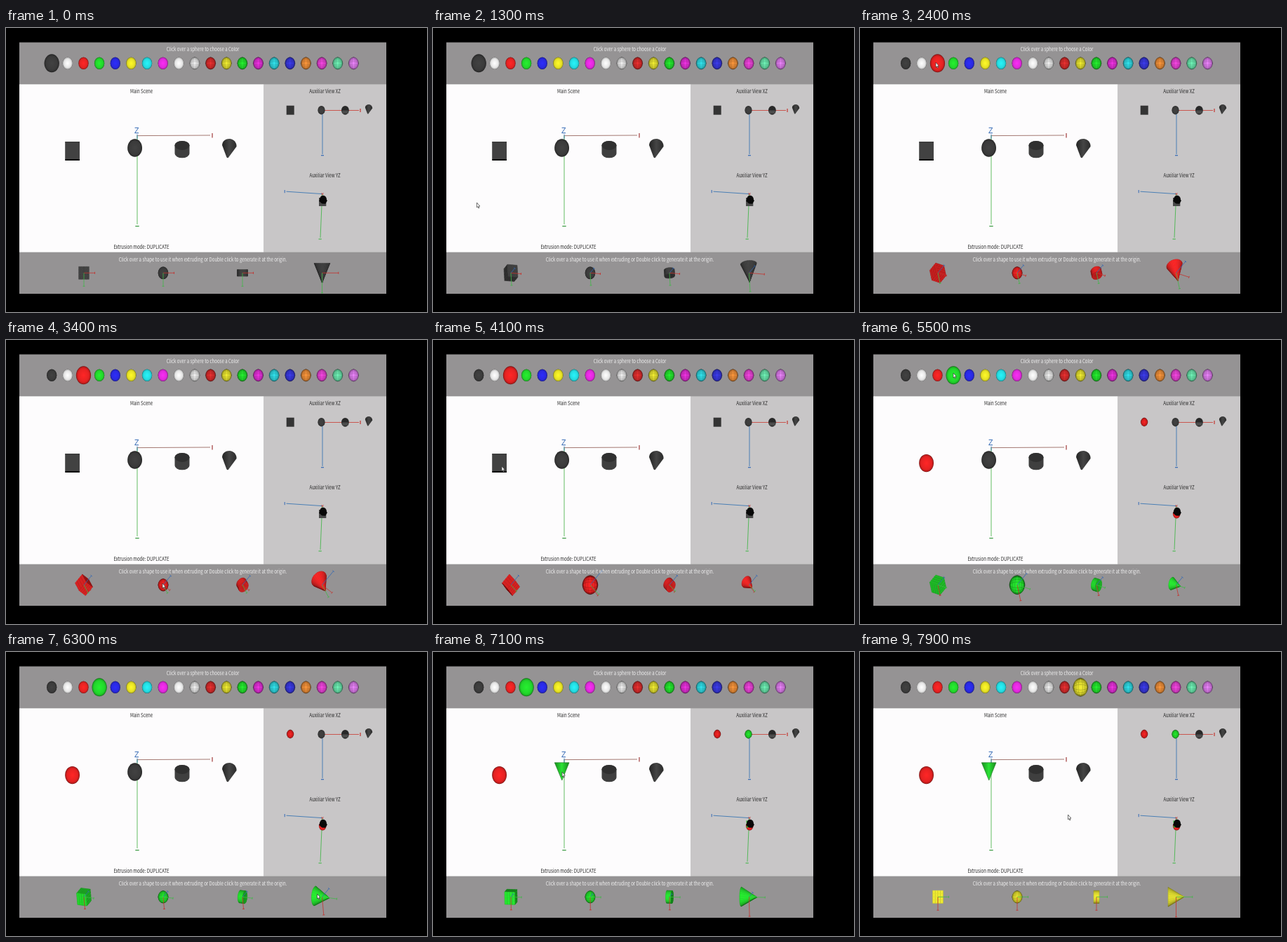
These frames come from a looping animation (600 px wide and 405 px high, 8000 ms). An HTML page with a canvas:

```html
<!DOCTYPE html>
<html lang="en">
<head>
<meta charset="utf-8">
<title>Shape extrusion scene</title>
<style>
  html, body { margin: 0; width: 100%; height: 100%; overflow: hidden; background: #000; }
  canvas, svg { position: absolute; left: 0; top: 0; width: 600px; height: 405px; }
  text {
    font: 14.9px "Noto Sans CJK SC", "Noto Sans CJK JP", "Noto Sans CJK", "Noto Sans", sans-serif;
    text-anchor: middle;
    fill: #2b2b2b;
  }
  .hint { fill: #f1f1f1; }
</style>
</head>
<body>
<canvas id="stage" width="600" height="405"></canvas>
<svg viewBox="0 0 600 405">
  <!-- the 1280x720 app is shown narrowed -->
  <g transform="translate(19 20.5) scale(.4086 .4986)">
    <text class="hint" x="640" y="26">Click over a sphere to choose a Color</text>
    <text x="426" y="146">Main Scene</text>
    <text x="1066" y="146">Auxiliar View XZ</text>
    <text x="1066" y="386">Auxiliar View YZ</text>
    <text x="426" y="590">Extrusion mode: DUPLICATE</text>
    <text class="hint" x="640" y="626">Click over a shape to use it when extruding or Double click to generate it at the origin.</text>
  </g>
</svg>
<script>
const ctx = document.getElementById('stage').getContext('2d');
const LOOP = 8000, STEP = 100, SX = .4086, SY = .4986, TAU = Math.PI * 2;

const BLACK = [66, 66, 66], RED = [255, 38, 38], GREEN = [38, 240, 48], YELLOW = [232, 226, 40];
const BLUE = [45, 45, 250], CYAN = [40, 244, 250], PINK = [250, 45, 245], WHITE = [255, 255, 255];
const PALETTE = [BLACK, WHITE, RED, GREEN, BLUE, [255, 250, 40], CYAN, PINK, WHITE, [240, 240, 240],
  [232, 48, 48], [240, 236, 50], GREEN, [238, 50, 225], [50, 225, 235], [60, 60, 235],
  [250, 150, 60], [245, 70, 225], [110, 240, 180], [232, 130, 248]];
const AXIS_X = '#c4342f', AXIS_Y = '#43b649', AXIS_Z = '#3268b4';

// clicks: [time, value]
const COLOR_PICKS = [[0, 0], [2000, 2], [5300, 3], [7500, 11]];
const SHAPE_PICKS = [[0, 3], [3500, 1], [6200, 3]];
const BOX_SWAP = 4300, BALL_SWAP = 7000;

// pointer: [time, x, y]
const POINTER = [[1000, 47, 262], [1300, 62.5, 249], [1900, 108, 49], [2500, 108, 49],
  [3200, 223, 347], [3600, 223, 347], [4150, 95, 176], [4400, 95, 176], [4700, 257, 185],
  [4850, 250, 170], [5250, 133, 47], [5500, 133, 47], [6100, 443.5, 345], [6400, 443.5, 345],
  [6850, 184, 171], [7100, 184, 171], [7400, 314, 47], [7550, 314, 47], [7900, 296.5, 232]];

const latest = (list, t) => list.filter(e => e[0] <= t).pop()[1];
const shade = (c, k) => `rgb(${c.map(v => Math.round(v * k))})`;

function rect(x, y, w, h, fill) {
  ctx.fillStyle = fill;
  ctx.fillRect(x, y, w, h);
}

function path(points, fill, stroke, width = 1) {
  ctx.beginPath();
  points.forEach(p => ctx.lineTo(p[0], p[1]));
  if (fill) { ctx.closePath(); ctx.fillStyle = fill; ctx.fill(); }
  if (stroke) { ctx.strokeStyle = stroke; ctx.lineWidth = width; ctx.stroke(); }
}

function oval(x, y, rx, ry, fill) {
  ctx.beginPath();
  ctx.ellipse(x, y, rx, ry, 0, 0, TAU);
  ctx.fillStyle = fill;
  ctx.fill();
}

function ball(x, y, r, color, mesh) {
  const rx = r * SX, ry = r * SY;
  ctx.save();
  ctx.translate(x, y);
  ctx.scale(rx, ry);
  const g = ctx.createRadialGradient(0, 0, 0, 0, 0, 1);
  g.addColorStop(0, shade(color, 1));
  g.addColorStop(.7, shade(color, .9));
  g.addColorStop(.9, shade(color, .74));
  g.addColorStop(1, shade(color, .42));
  oval(0, 0, 1, 1, g);
  if (mesh) {
    ctx.strokeStyle = 'rgba(0,0,0,.17)';
    ctx.lineWidth = .08;
    for (const k of [.3, .6, .85]) {
      ctx.beginPath();
      ctx.ellipse(0, 0, k, 1, 0, 0, TAU);
      ctx.moveTo(1, 0);
      ctx.ellipse(0, 0, 1, k, 0, 0, TAU);
      ctx.stroke();
    }
  }
  ctx.restore();
}

// meshes: faces of {n: normal, p: points}
function boxMesh(s, parts = 4) {
  const faces = [], step = 2 * s / parts;
  for (let axis = 0; axis < 3; axis++) for (const side of [-1, 1])
    for (let i = 0; i < parts; i++) for (let j = 0; j < parts; j++) {
      const put = (a, b, c) => {
        const v = [];
        v[axis] = c; v[(axis + 1) % 3] = a; v[(axis + 2) % 3] = b;
        return v;
      };
      const a = -s + i * step, b = -s + j * step, c = side * s;
      faces.push({ n: put(0, 0, side),
        p: [put(a, b, c), put(a + step, b, c), put(a + step, b + step, c), put(a, b + step, c)] });
    }
  return faces;
}

// top radius at -h, bottom radius at +h
function tubeMesh(top, bottom, h, parts = 24) {
  const ring = (r, y, i) => [r * Math.cos(i * TAU / parts), y, r * Math.sin(i * TAU / parts)];
  const slope = (top - bottom) / (2 * h), len = Math.hypot(1, slope);
  const faces = [];
  for (let i = 0; i < parts; i++) {
    const n = ring(1, slope, i + .5).map(v => v / len);
    faces.push({ n, p: [ring(top, -h, i), ring(top, -h, i + 1), ring(bottom, h, i + 1), ring(bottom, h, i)] });
    faces.push({ n: [0, -1, 0], p: [[0, -h, 0], ring(top, -h, i), ring(top, -h, i + 1)] });
    faces.push({ n: [0, 1, 0], p: [[0, h, 0], ring(bottom, h, i), ring(bottom, h, i + 1)] });
  }
  return faces;
}

const MODELS = [boxMesh(18), null, tubeMesh(18, 18, 9.5), tubeMesh(18.5, 0, 18.5)];
const MODEL_X = [111, 224, 337, 450.5], MODEL_Y = 349.3;

// turn about the (1, 1, 0) diagonal
function turn([x, y, z], angle) {
  const c = Math.cos(angle), s = Math.sin(angle) * Math.SQRT1_2;
  const m = (x + y) / 2, d = (x - y) / 2;
  return [m + c * d + s * z, m - c * d - s * z, c * z + s * (y - x)];
}

function model(faces, x, y, scale, angle, color) {
  const place = v => {
    const w = turn(v, angle);
    return [x + w[0] * scale * SX, y + w[1] * scale * SY];
  };
  if (!faces) ball(x, y, 18 * scale, color, color !== BLACK);
  else for (const f of faces) {
    const nz = turn(f.n, angle)[2];
    if (nz < .01) continue;
    const fill = shade(color, .5 + .5 * nz);
    const pts = f.p.map(place);
    path([...pts, pts[0]], fill, fill, .6);
    if (color !== BLACK) path(pts, null, 'rgba(0,0,0,.2)', .5);
  }
  const o = place([0, 0, 0]);
  [[AXIS_Z, [0, 0, 38]], [AXIS_X, [38, 0, 0]], [AXIS_Y, [0, 38, 0]]].forEach(([ink, v]) => {
    const e = place(v), dx = e[0] - o[0], dy = e[1] - o[1], len = Math.hypot(dx, dy);
    if (len < 2) return;
    path([o, e], null, ink, .8);
    const tx = -dy / len * 1.5, ty = dx / len * 1.5;
    path([[e[0] - tx, e[1] - ty], [e[0] + tx, e[1] + ty]], null, ink, .9);
  });
}

function cone(x, y, k) {
  const g = ctx.createLinearGradient(x - 10 * k, y, x + 10 * k, y);
  g.addColorStop(0, '#252525');
  g.addColorStop(.5, '#454545');
  g.addColorStop(1, '#2c2c2c');
  ctx.save();
  ctx.translate(x, y);
  ctx.scale(k, k);
  ctx.beginPath();
  ctx.moveTo(-10.3, -4);
  ctx.bezierCurveTo(-10, -10, -5, -13, 0, -13);
  ctx.bezierCurveTo(6, -13, 10.5, -8, 10.3, -2);
  ctx.lineTo(-1.5, 14);
  ctx.quadraticCurveTo(-3, 15, -4, 13);
  ctx.closePath();
  ctx.restore();
  ctx.fillStyle = g;
  ctx.fill();
}

function panels() {
  rect(0, 0, 600, 405, '#000');
  rect(19, 20.5, 523, 358.5, '#959394');
  rect(19, 80.3, 348.5, 239.4, '#fdfcfd');
  rect(367.5, 80.3, 174.5, 239.4, '#c8c6c7');
}

function mainScene(t) {
  path([[187, 153.6], [291, 153]], null, '#9a6a62', .9);
  path([[294, 150], [294, 156.5]], null, '#a23a3a', 1.2);
  path([[187, 153], [187, 280]], null, '#62bd62', 1);
  path([[184.3, 282.6], [189.7, 282.6]], null, '#3f9c46', 1.3);
  path([[183.6, 142.3], [188.8, 142.3], [183.6, 149.7], [189, 149.7]], null, AXIS_Z, 1);
  path([[187, 151.5], [187, 158]], null, AXIS_Z, .8);

  if (t < BOX_SWAP) {
    rect(84.2, 162.3, 20.8, 25, '#424242');
    rect(84.2, 162.3, 20.8, 1, '#2c2c2c');
    rect(84.2, 187, 20.8, 2, '#090909');
  } else ball(94.6, 175.6, 25.5, RED);

  if (t < BALL_SWAP) ball(183.6, 171, 25.5, BLACK);
  else {
    const g = ctx.createLinearGradient(173, 0, 194, 0);
    g.addColorStop(0, '#178a1c');
    g.addColorStop(.5, '#2be236');
    g.addColorStop(1, '#178a1c');
    path([[173.3, 157.8], [194, 157.8], [183.8, 183]], g, '#176d1b', .6);
  }

  ctx.beginPath();
  ctx.ellipse(251, 167, 10.5, 6, 0, Math.PI, TAU);
  ctx.ellipse(251, 179, 10.5, 6.3, 0, 0, Math.PI);
  ctx.fillStyle = '#3f3f3f';
  ctx.fill();
  oval(251, 167.5, 10.5, 6.5, '#303030');
  cone(318.3, 171, 1);
}

function auxiliaryTop(t) {
  path([[451, 117.5], [451, 180]], null, '#4a7fb5', 1);
  path([[449, 181.7], [453, 181.7]], null, AXIS_Z, 1.2);
  path([[451, 117.5], [503, 117.5]], null, '#c9564f', 1);
  path([[505, 115], [505, 120]], null, AXIS_X, 1.2);
  if (t < BOX_SWAP) rect(399.7, 110.7, 11, 13, '#343434');
  else ball(405.1, 117, 12.4, RED, true);
  ball(449.5, 117.2, 12.4, t < BALL_SWAP ? BLACK : GREEN, t >= BALL_SWAP);
  oval(483.4, 117.3, 5.4, 6.4, '#282828');
  rect(479.2, 117.5, 8.4, 4.5, '#4b4b4b');
  cone(517, 115.4, .5);
}

function auxiliarySide(t) {
  path([[399.5, 233.2], [450.5, 236.6]], null, '#4a7fb5', 1);
  path([[397.2, 231], [397.2, 235.2]], null, AXIS_Z, 1);
  path([[450.7, 237], [448, 299]], null, '#55b85a', 1);
  path([[445.5, 301], [449.8, 301]], null, AXIS_Y, 1.1);
  if (t < BOX_SWAP) {
    rect(446, 242, 10.3, 12, '#4a4a4a');
  } else ball(451.2, 248, 13, RED);
  if (t >= BALL_SWAP) path([[446.5, 240], [457, 246], [447, 251]], '#25b52d');
  oval(452, 244.8, 5, 6, '#0c0c0c');
  path([[446, 247], [450, 239], [458, 246], [455, 251]], '#080808');
  path([[449.6, 235.2], [452.4, 238]], null, AXIS_X, .9);
  path([[452.4, 235.2], [449.6, 238]], null, AXIS_X, .9);
}

function pointer(t) {
  const i = POINTER.findIndex((k, n) => n && t <= k[0]);
  if (t < POINTER[0][0] || i < 0) return;
  const [t0, x0, y0] = POINTER[i - 1], [t1, x1, y1] = POINTER[i];
  const u = (t - t0) / (t1 - t0), e = u * u * (3 - 2 * u);
  ctx.save();
  ctx.translate(x0 + (x1 - x0) * e, y0 + (y1 - y0) * e);
  path([[0, 0], [0, 7], [1.4, 5.6], [2.4, 8], [3.4, 7.5], [2.5, 5.2], [4.3, 5.1], [0, 0]], '#fff', '#333', .7);
  ctx.restore();
}

function draw(t) {
  const pick = latest(COLOR_PICKS, t), chosen = latest(SHAPE_PICKS, t);
  panels();
  PALETTE.forEach((c, i) => ball(65.2 + i * 22.64, 50.3, i === pick ? 26 : 17.6, c, i > 8));
  mainScene(t);
  auxiliaryTop(t);
  auxiliarySide(t);
  const angle = Math.PI * t / 7900;
  MODELS.forEach((m, i) => model(m, MODEL_X[i], MODEL_Y, i === chosen ? 1.5 : 1, angle, PALETTE[pick]));
  pointer(t);
}

const start = performance.now();
function frame() {
  const t = (performance.now() - start) % LOOP;
  draw(Math.floor(t / STEP) * STEP);
  requestAnimationFrame(frame);
}
frame();
</script>
</body>
</html>
```
